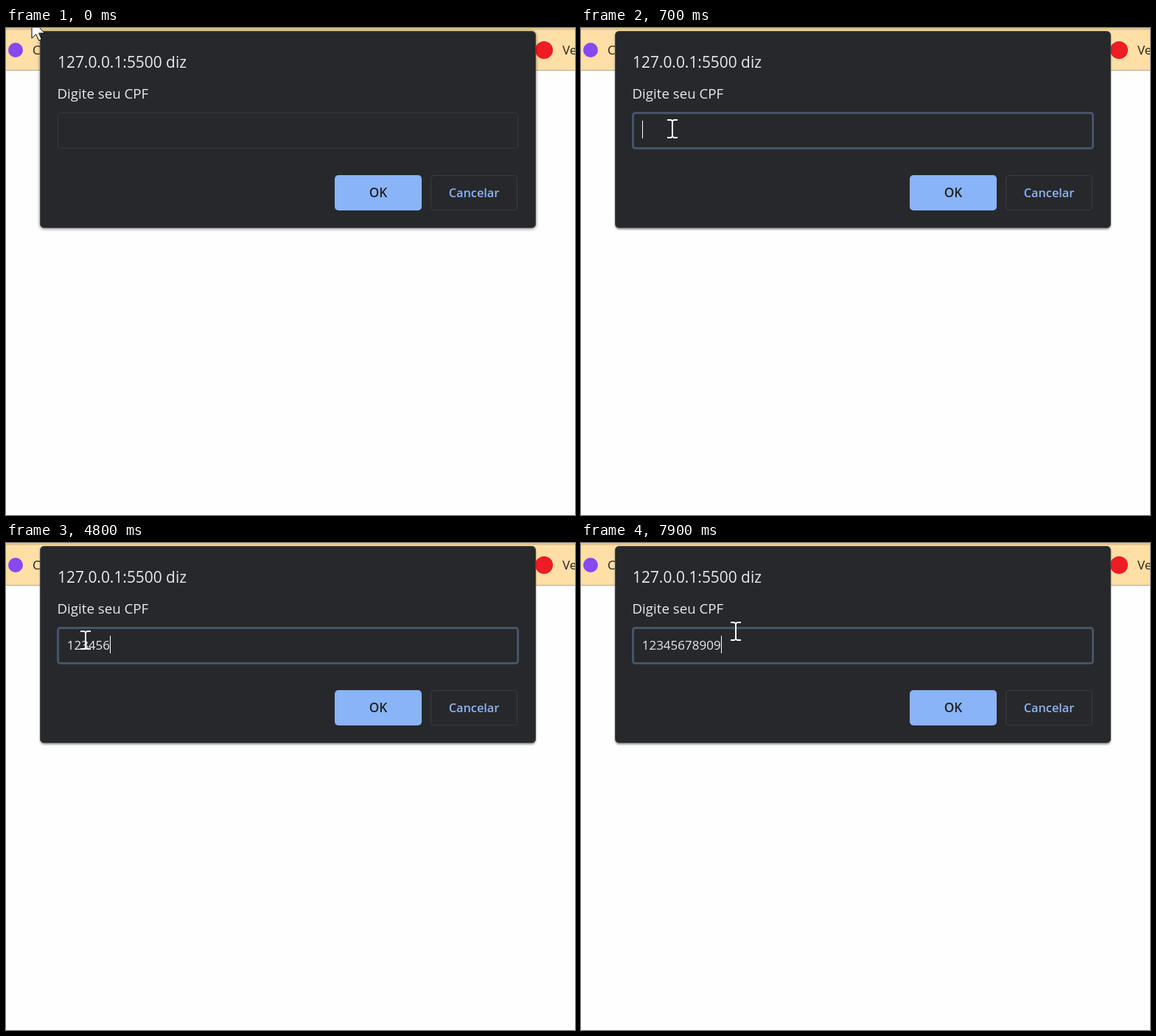
An HTML page for the animation above (8000 ms loop, 772x662 px).

```html
<!DOCTYPE html>
<html lang="pt-BR">
<head>
<meta charset="utf-8">
<title>Prompt</title>
<style>
  html, body { margin: 0; width: 100%; height: 100%; overflow: hidden; background: #fefefe; }
  svg { display: block; width: 772px; height: 662px; }
  text { font-family: "Open Sans", "Noto Sans", sans-serif; fill: #e8eaed; white-space: pre; }
  .bookmark { font-size: 17px; fill: #2a2118; }
  .button { font-weight: 600; text-anchor: middle; }
  #dialog { filter: drop-shadow(0 2px 1px rgba(0, 0, 0, .38)); }
  #dialog.opening { filter: drop-shadow(0 1px 2px rgba(0, 0, 0, .5)); }
</style>
</head>
<body>
<svg viewBox="0 0 772 662">
  <rect width="772" height="662" fill="#fefefe"/>
  <rect width="772" height="57" fill="#ffdfa6"/>
  <rect width="772" height="3" fill="#e2c590"/>
  <rect y="57" width="772" height="1" fill="#b9a78a"/>
  <circle cx="13" cy="30" r="10" fill="#8649f2"/>
  <text class="bookmark" x="36" y="36">C</text>
  <circle cx="730" cy="30" r="12" fill="#ee1c25"/>
  <text class="bookmark" x="755" y="36">Ve</text>

  <rect id="dialog" x="46.5" y="4.5" width="672" height="267" rx="5" fill="#27282b" stroke="#47484b"/>
  <text x="70" y="54" font-size="20.9">127.0.0.1:5500 diz</text>
  <text x="69.5" y="96" font-size="18.7">Digite seu CPF</text>

  <rect id="field" x="70.5" y="115.5" width="624" height="48" rx="3" fill="none" stroke="#393a3f"/>
  <rect id="focus" x="70.5" y="115.5" width="624" height="48" rx="3" fill="none" stroke="#46546a" stroke-width="3"/>
  <text id="typed" x="82.7" y="145.4" font-size="17"></text>
  <rect id="caret" y="126" width="1" height="24" fill="#fff"/>

  <rect x="446" y="200" width="118" height="48" rx="5" fill="#8ab4f8"/>
  <text class="button" x="505" y="230" font-size="17.2" style="fill:#202124">OK</text>
  <rect x="576.5" y="200.5" width="117" height="47" rx="4" fill="none" stroke="#393c46"/>
  <text class="button" x="635" y="230" font-size="16.3" style="fill:#8ab4f8">Cancelar</text>

  <path id="arrow" d="M0 0V25L5.8 19.5L9.6 28L13.3 26.4L9.6 18H17.5Z" fill="#fff" stroke="#000"/>
  <path id="beam" d="M-7 -12H-2L0 -10.5L2 -12H7M-7 12H-2L0 10.5L2 12H7M0 -11V11" fill="none" stroke="#fff" stroke-width="2"/>
</svg>
<script>
  const LOOP = 8000;
  const FOCUS_AT = 700;
  const DIGITS = "12345678909";
  const KEY_TIMES = [2800, 3300, 3700, 4100, 4500, 4800, 5300, 5700, 6100, 6500, 6900];
  const CARET_OFF = [[1400, 1900], [2300, 2800], [7400, 7900]];
  // Pointer stops: time, x, y
  const POINTER = [
    [0, 34.5, -11], [600, 124, 137], [900, 124, 137],
    [1200, 108, 132], [7700, 108, 132], [7900, 210, 120], [LOOP, 210, 120]
  ];

  const part = id => document.getElementById(id);
  const [dialog, field, focus, typed, caret, arrow, beam] =
    ["dialog", "field", "focus", "typed", "caret", "arrow", "beam"].map(part);
  const show = (node, on) => { node.style.visibility = on ? "visible" : "hidden"; };
  const smooth = p => p * p * (3 - 2 * p);

  function pointerAt(t) {
    const i = POINTER.findIndex(stop => stop[0] > t);
    const [t0, x0, y0] = POINTER[i - 1];
    const [t1, x1, y1] = POINTER[i];
    const p = smooth((t - t0) / (t1 - t0));
    return [Math.round(x0 + (x1 - x0) * p), Math.round(y0 + (y1 - y0) * p)];
  }

  function draw(time) {
    const t = Math.floor((time % LOOP) / 100) * 100;
    const focused = t >= FOCUS_AT;
    const count = KEY_TIMES.filter(key => key <= t).length;
    const blinkedOff = CARET_OFF.some(([from, to]) => t >= from && t < to);
    const [x, y] = pointerAt(t);
    const overField = focused || y > 115;

    dialog.classList.toggle("opening", t < 100);
    show(field, !focused);
    show(focus, focused);
    typed.textContent = DIGITS.slice(0, count);
    caret.setAttribute("x", Math.floor(83.3 + 9.75 * count));
    show(caret, focused && !blinkedOff);

    const place = `translate(${x} ${y})`;
    arrow.setAttribute("transform", place);
    beam.setAttribute("transform", place);
    show(arrow, !overField);
    show(beam, overField);
  }

  const start = performance.now();
  function tick() {
    draw(performance.now() - start);
    requestAnimationFrame(tick);
  }
  tick();
</script>
</body>
</html>
```
